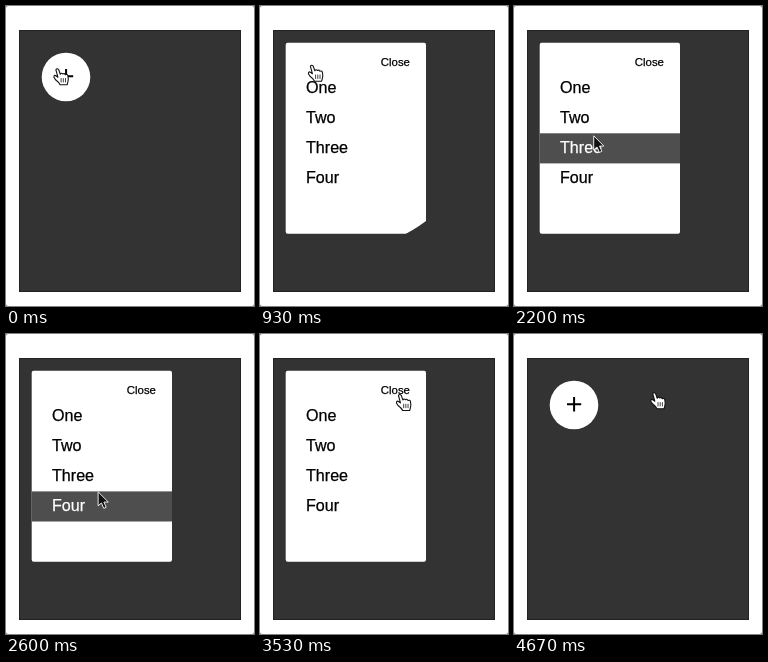
Write an HTML page that moves like this. It is 248 px wide and 300 px high and loops after 4.74 s.

```html
<!DOCTYPE html>
<html lang="en">
<head>
<meta charset="utf-8">
<title>Expanding menu</title>
<style>
  html, body { margin: 0; width: 100%; height: 100%; overflow: hidden; background: #fff; }
  svg { display: block; width: 100vw; height: 100vh; }
  text { font-family: "Liberation Sans", Arial, sans-serif; stroke-width: .25; }
</style>
</head>
<body>
<svg viewBox="0 0 248 300">
  <defs>
    <clipPath id="reveal"><circle id="hole" cx="60" cy="71"/></clipPath>
  </defs>
  <rect width="248" height="300" fill="#666"/>
  <rect width="248" height="300" rx="2" fill="#fff"/>
  <rect x="13.5" y="24.5" width="221" height="261" fill="#333" stroke="#222"/>

  <g clip-path="url(#reveal)">
    <rect x="25.7" y="36.7" width="140.3" height="191" rx="2" fill="#fff"/>
    <path id="plus" d="M53 70.2h14.2M60.1 63v14.4" stroke="#000" stroke-width="2"/>
    <g id="content">
      <text x="120.8" y="60" font-size="11.4" stroke="#000">Close</text>
    </g>
  </g>

  <g id="hand" stroke="#111" stroke-width="1.1" stroke-linejoin="round" stroke-linecap="round">
    <path fill="#fff" d="M-1.6 1Q-.5-1 1.2.8L2.8 5.4Q4 3.6 5.3 5.2Q6.8 4 7.9 6Q9.8 5 10.4 7L10.8 10.5Q10.6 13 9.6 16H2.6Q1.6 13.6-2 11L-3.6 8.4Q-3.6 5.6-1.2 7.2L.4 8.4Z"/>
    <path fill="none" stroke-width=".8" d="M3.6 9.7v3.5M5.8 9.7v3.5M8 9.7v3.5"/>
  </g>
  <path id="arrow" d="M0 0V14L3.3 11.2L5.7 16.6L8.1 15.5L5.8 10.3H10.2Z" fill="#111" stroke="#e8e8e8" stroke-linejoin="round"/>
</svg>

<script>
const LOOP = 4740, OPEN = 660, CLOSE = 3850, DURATION = 500;
const R_MIN = 24.3, R_MAX = 208;
const ROW_TOP = 67.1, ROW_H = 30.1;
const $ = id => document.getElementById(id);

// Pointer key points: time, x, y
const path = [
  [400, 51.5, 62.8], [700, 52, 59.3], [1800, 52, 59.3], [1870, 57, 61],
  [2380, 92, 167], [2600, 92, 158], [3000, 136, 79.5], [3400, 140, 60.8], [4330, 140.4, 58.8]
];

const clamp = v => Math.max(0, Math.min(1, v));
const mix = (a, b, k) => a + (b - a) * k;
const progress = (t, start, length) => clamp((t - start) / length);

// CSS "ease": cubic-bezier(.25, .1, .25, 1)
function ease(x) {
  const bez = (a, b, s) => 3 * a * s * (1 - s) ** 2 + 3 * b * s * s * (1 - s) + s ** 3;
  let lo = 0, hi = 1;
  for (let i = 0; i < 18; i++) {
    const mid = (lo + hi) / 2;
    if (bez(.25, .25, mid) < x) lo = mid; else hi = mid;
  }
  return bez(.1, 1, lo);
}

function pointerAt(t) {
  const next = path.findIndex(p => p[0] > t);
  const b = path.at(next);
  const a = next > 0 ? path[next - 1] : b;
  const k = a === b || next < 0 ? 1 : progress(t, a[0], b[0] - a[0]);
  return [mix(a[1], b[1], k), mix(a[2], b[2], k)];
}

function make(tag, attrs) {
  const el = document.createElementNS("http://www.w3.org/2000/svg", tag);
  for (const key in attrs) el.setAttribute(key, attrs[key]);
  return $("content").appendChild(el);
}

const rows = ["One", "Two", "Three", "Four"].map((label, i) => {
  const y = ROW_TOP + i * ROW_H;
  const bar = make("rect", { x: 25.7, y, width: 140.3, height: ROW_H, fill: "#4e4e4e" });
  const text = make("text", { x: 46, y: y + 20, "font-size": 16.1 });
  text.textContent = label;
  return { bar, text };
});

function show(el, visible) {
  el.setAttribute("visibility", visible ? "visible" : "hidden");
}

function draw(t) {
  const open = ease(progress(t, OPEN, DURATION)) - ease(progress(t, CLOSE, DURATION));
  const shown = progress(t, OPEN, 200) - progress(t, CLOSE + 60, 240);
  $("hole").setAttribute("r", mix(R_MIN, R_MAX, open));
  $("content").setAttribute("opacity", shown);
  $("plus").setAttribute("opacity", 1 - shown);

  const [x, y] = pointerAt(t);
  const hover = Math.floor((y - ROW_TOP) / ROW_H);
  rows.forEach(({ bar, text }, i) => {
    const color = i === hover ? "#fff" : "#000";
    show(bar, i === hover);
    text.setAttribute("fill", color);
    text.setAttribute("stroke", color);
  });
  show($("hand"), hover < 0);
  show($("arrow"), hover >= 0);
  for (const id of ["hand", "arrow"]) $(id).setAttribute("transform", `translate(${x} ${y})`);
}

const start = performance.now();
function tick() {
  draw((performance.now() - start) % LOOP);
  requestAnimationFrame(tick);
}
tick();
</script>
</body>
</html>
```
